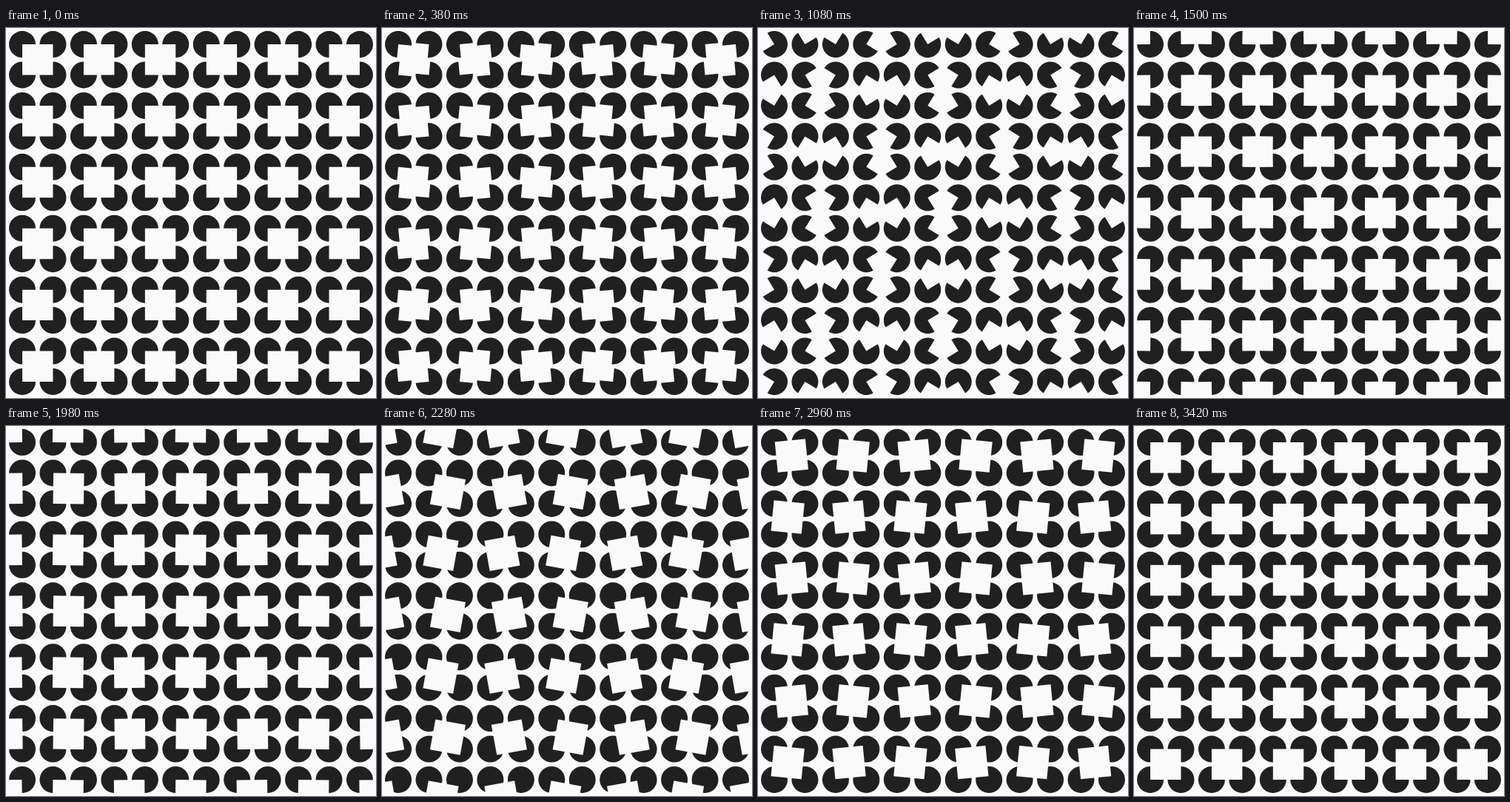
An HTML page with a canvas that plays this animation: 500 px wide and 500 px high, repeating every 3.44 s.

```html
<!DOCTYPE html>
<html lang="en">
<head>
<meta charset="utf-8">
<title>Illusory squares</title>
<style>
  html, body { margin: 0; width: 100%; height: 100%; overflow: hidden; background: #fafafa; }
  canvas { display: block; }
</style>
</head>
<body>
<canvas id="stage" width="500" height="500"></canvas>
<script>
const SIZE = 500, COUNT = 12, PITCH = 41.45, RADIUS = 18;
const LOOP = 3440, STEP = 20, HALF = LOOP / 2;
const SAMPLES = 4, SHUTTER = 0.6;
const PAPER = '#fafafa', INK = '#202020';

const stage = document.getElementById('stage').getContext('2d');
const layer = document.createElement('canvas');
layer.width = layer.height = SIZE;
const ctx = layer.getContext('2d');

const at = k => SIZE / 2 + (k - (COUNT - 1) / 2) * PITCH;
const ease = p => p < 0.5 ? 0.5 * (2 * p) ** 3.5 : 1 - 0.5 * (2 - 2 * p) ** 3.5;

function eachDisc(draw) {
  for (let row = 0; row < COUNT; row++)
    for (let col = 0; col < COUNT; col++) {
      ctx.beginPath();
      draw(col, row);
      ctx.fill();
    }
}

// Notched discs turn half a circle, each group of four against its neighbours.
function turnDiscs(e) {
  eachDisc((col, row) => {
    const spin = ((col >> 1) + (row >> 1)) % 2 ? -1 : 1;
    const mouth = Math.atan2(row % 2 ? -1 : 1, col % 2 ? -1 : 1) + spin * e * Math.PI;
    ctx.moveTo(at(col), at(row));
    ctx.arc(at(col), at(row), RADIUS, mouth + Math.PI / 4, mouth + Math.PI * 7 / 4);
  });
}

// Paper-coloured squares roll diagonally over whole discs.
function moveSquares(e) {
  eachDisc((col, row) => ctx.arc(at(col), at(row), RADIUS, 0, Math.PI * 2));
  ctx.fillStyle = PAPER;
  for (let j = 0; j <= COUNT / 2; j++)
    for (let i = 0; i <= COUNT / 2; i++) {
      ctx.save();
      ctx.translate(at(2 * i - 0.5 + (j % 2 ? e : -e)), at(2 * j - 0.5 + e));
      ctx.rotate((i % 2 ? 1 : -1) * e * Math.PI / 2);
      ctx.fillRect(-PITCH / 2, -PITCH / 2, PITCH, PITCH);
      ctx.restore();
    }
}

function drawScene(time) {
  ctx.fillStyle = PAPER;
  ctx.fillRect(0, 0, SIZE, SIZE);
  ctx.fillStyle = INK;
  if (time < HALF) turnDiscs(ease(time / HALF));
  else moveSquares(ease(time / HALF - 1));
}

// Average a few moments of each step for motion blur.
function render(now) {
  const time = Math.floor(now % LOOP / STEP) * STEP;
  for (let s = 0; s < SAMPLES; s++) {
    drawScene(time + STEP * SHUTTER * s / SAMPLES);
    stage.globalAlpha = 1 / (s + 1);
    stage.drawImage(layer, 0, 0);
  }
}

const start = performance.now();
function tick() {
  render(performance.now() - start);
  requestAnimationFrame(tick);
}
tick();
</script>
</body>
</html>
```
